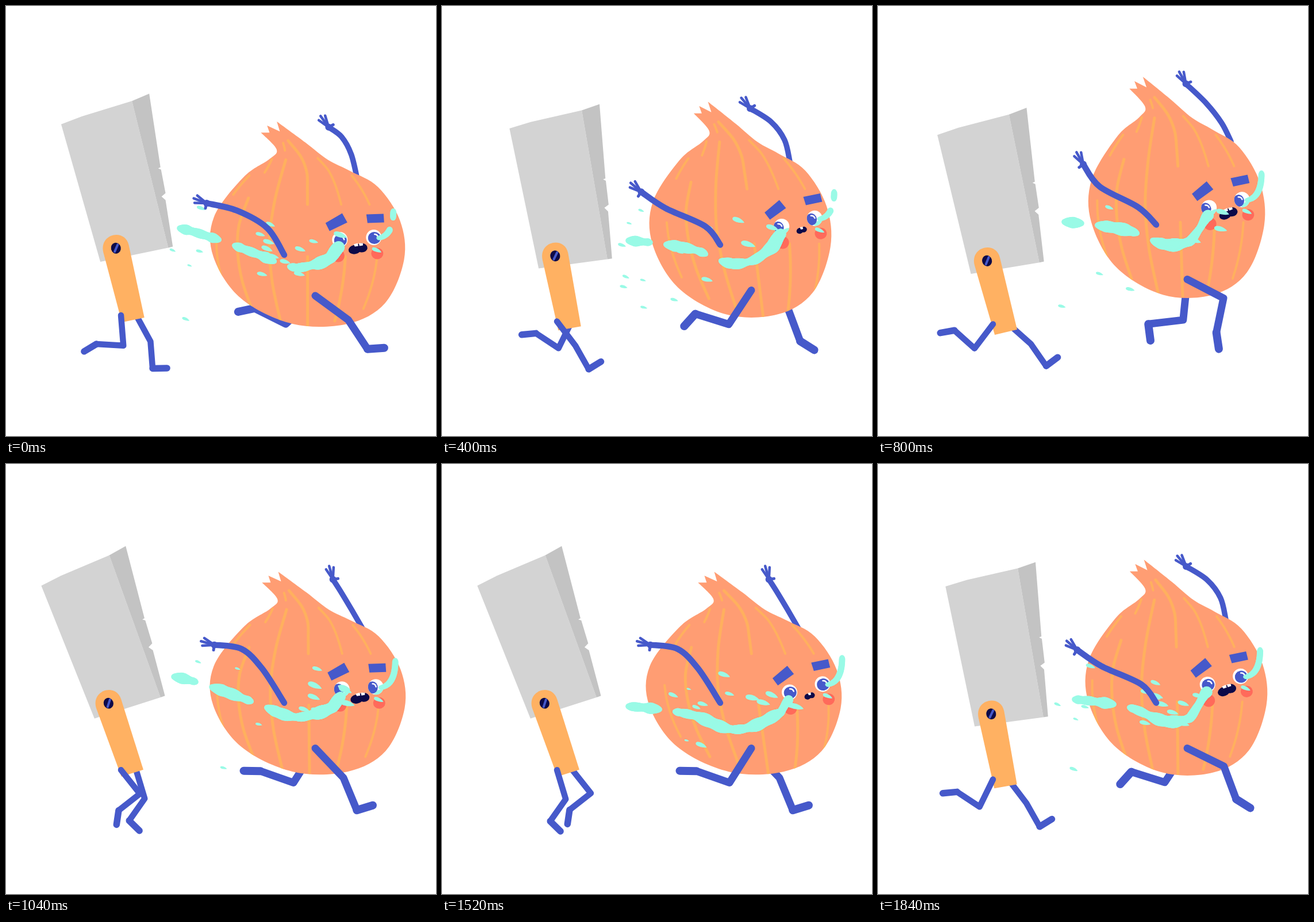
Write an HTML page with a canvas that moves like this. It is 748 by 748 pixels and loops after 1.92 s.

```html
<!DOCTYPE html>
<html lang="en">
<head>
<meta charset="utf-8">
<title>Onion on the run</title>
<style>
html, body { margin: 0; width: 100%; height: 100%; overflow: hidden; background: #fff; }
canvas { display: block; width: 100vw; height: 100vh; }
</style>
</head>
<body>
<canvas id="stage" width="748" height="748"></canvas>
<script>
const ctx = document.getElementById('stage').getContext('2d');
const STEP = 80, COUNT = 24, BOUNCE = 6, STRIDE = 12;
const C = {
  skin: '#ff9d73', stripe: '#ffb05e', wood: '#ffb162', steel: '#d3d3d3', edge: '#c3c3c3',
  blue: '#4659ca', navy: '#0d0a48', tear: '#99fae6', cheek: '#ff6a5b', white: '#fff'
};

const rad = d => d * Math.PI / 180;
const clamp = (v, a, b) => Math.max(a, Math.min(b, v));
const mix = (a, b, u) => a + (b - a) * u;
const rnd = (i, k) => { const v = Math.sin(i * 127.1 + k * 311.7) * 43758.5453; return v - Math.floor(v); };

// Periodic motion: mean plus two harmonics
function wave(n, period, mean, c1, s1, c2 = 0, s2 = 0) {
  const a = n / period * 2 * Math.PI;
  return mean + c1 * Math.cos(a) + s1 * Math.sin(a) + c2 * Math.cos(2 * a) + s2 * Math.sin(2 * a);
}

function spline(pts) {
  ctx.moveTo(...pts[0]);
  for (let i = 0; i < pts.length - 1; i++) {
    const a = pts[i - 1] || pts[i], b = pts[i], c = pts[i + 1], d = pts[i + 2] || c;
    ctx.bezierCurveTo(b[0] + (c[0] - a[0]) / 6, b[1] + (c[1] - a[1]) / 6,
      c[0] - (d[0] - b[0]) / 6, c[1] - (d[1] - b[1]) / 6, c[0], c[1]);
  }
}
function line(pts, width, color = C.blue) {
  ctx.beginPath();
  pts.forEach(p => ctx.lineTo(...p));
  ctx.lineWidth = width;
  ctx.strokeStyle = color;
  ctx.stroke();
}
function curve(pts, width, color = C.blue) {
  ctx.beginPath();
  spline(pts);
  ctx.lineWidth = width;
  ctx.strokeStyle = color;
  ctx.stroke();
}
function poly(pts, color) {
  ctx.beginPath();
  pts.forEach(p => ctx.lineTo(...p));
  ctx.closePath();
  ctx.fillStyle = color;
  ctx.fill();
}
function oval(x, y, rx, ry, color, turn = 0) {
  ctx.beginPath();
  ctx.ellipse(x, y, rx, ry, turn, 0, 7);
  ctx.fillStyle = color;
  ctx.fill();
}

// Bone angles are in degrees from straight down, forward is positive.
function leg(hip, bones, width) {
  const pts = [hip];
  for (const [len, deg] of bones) {
    const [x, y] = pts[pts.length - 1];
    pts.push([x + len * Math.sin(rad(deg)), y + len * Math.cos(rad(deg))]);
  }
  line(pts.slice(0, 3), width);
  line(pts.slice(2), width + 1);
}
function onionLeg(hip, p) {
  leg(hip, [
    [71, wave(p, STRIDE, 17, 50, -10.6, -13.2, -5.5)],
    [61, wave(p, STRIDE, -45.5, 75, 2, 4)],
    [29, wave(p, STRIDE, 8, 86, 49)]
  ], 13);
}
function knifeLeg(hip, p) {
  leg(hip, [
    [53, wave(p, STRIDE, 16.6, -12, 42.5, 0, 12.7)],
    [47, wave(p, STRIDE, -46, -49, 68, 1.5, 2)],
    [25, wave(p, STRIDE, 21, -75, 76, -5)]
  ], 10.5);
}

function arm(from, to, bowA, bowB, width, bias, side) {
  const at = (u, bow) => [mix(from[0], to[0], u) + bow[0], mix(from[1], to[1], u) + bow[1]];
  const wrist = at(0.67, bowB);
  curve([from, at(0.33, bowA), wrist, to], width);
  const a = Math.atan2(to[1] - wrist[1], to[0] - wrist[0]) + bias;
  const finger = (turn, len, w = 4.5) =>
    line([to, [to[0] + Math.cos(a + turn) * len, to[1] + Math.sin(a + turn) * len]], w);
  for (let i = -1; i < 2; i++) finger(i * 0.33, 24 - 3 * Math.abs(i));
  finger(side * 1.7, 9, 5);
  oval(...to, 6, 6, C.blue);
}
function nearArm(n) {
  const w = (...k) => wave(n, BOUNCE, ...k);
  const bend = w(-11, -6, -14);
  arm([484, w(398, 35, 0)], [w(359.7, -10.7, 9.2), w(295, 48, -5)],
    [w(6, 9, -10), bend], [w(-3, 10.7, 5.8), bend], 10.5, 0.12, -1);
}
function farArm(n) {
  const w = (...k) => wave(n, BOUNCE, ...k);
  const bow = [w(2, 4, -11), w(-5, -8, -2)];
  arm([w(620, -9, 12), w(266, 35, 14.7)], [w(555, 0.5, 18.8, 5.8), w(168, 42.8, 13)], bow, bow, 9.5, 0.3, 1);
}

const OUTLINE = [
  [474, 202], [523, 238], [562, 268], [600, 287], [649, 315], [687, 373], [694, 440], [661, 515],
  [595, 551], [500, 551], [410, 507], [362, 435], [363, 367], [415, 298], [460, 267], [473, 250], [446, 221]
];

function onion(n, sway) {
  const w = (...k) => wave(n, BOUNCE, ...k);
  const left = w(360, -5.3, -3.5), right = w(687.5, 4, 10.4, 4);
  const top = w(156, 43.5, 12, 1.5), bottom = w(524, 34, -1), lean = w(-5.5, 4, 5);
  const place = ([x, y]) => {
    const h = Math.max(0, (411 - y) / 209);
    return [left + (x - 356) / 341 * (right - left) + lean * h * h, top + (y - 202) / 354 * (bottom - top)];
  };
  ctx.beginPath();
  spline(OUTLINE.map(place));
  for (const p of [[461, 221], [457, 209], [479, 219]]) ctx.lineTo(...place(p));
  ctx.closePath();
  ctx.fillStyle = C.skin;
  ctx.fill();
  ctx.save();
  ctx.clip();
  // Stripes follow the meridians and slide as the onion turns.
  const stripe = (u, y0, y1) => {
    const pts = [];
    for (let i = 0; i <= 4; i++) {
      const y = mix(y0, y1, i / 4), up = Math.max(0, (300 - y) / 60);
      const half = y < 410 ? 170 * (1 - ((410 - y) / 190) ** 2) : 170 - 40 * ((y - 410) / 123) ** 2;
      pts.push(place([526 - 28 * up * up + u * half + 0.15 * sway * (y - 250), y]));
    }
    curve(pts, y1 - y0 > 90 ? 5 : 4, C.stripe);
  };
  for (let i = 0; i < 6; i++) {
    const u = Math.sin(rad(-69 + 23 * i));
    stripe(u, i < 3 ? 400 - 66 * i : 435, 553 - 7 * (i - 3) ** 2);
    if (i > 2) stripe(u, 205 + 30 * (i - 2), 345);
    else stripe(u, 295 - 28 * i, 328 - 38 * i);
  }
  ctx.restore();
}

function eye(x, y, gaze, shut) {
  ctx.save();
  ctx.translate(x, y);
  if (shut) ctx.scale(0.95, 0.4);
  oval(0, 0, 13.5, 13.5, C.white);
  ctx.clip();
  if (gaze || shut) oval(7, 11, 10, 6, C.tear, -0.3);
  const px = shut ? 0 : gaze ? -6 : 1;
  oval(px, shut ? 4 : 1, gaze ? 9.5 : 11, 10.5, C.blue);
  if (!shut) {
    ctx.beginPath();
    ctx.arc(px, 1, 6.5, -1.5, -0.2);
    ctx.lineWidth = 2.5;
    ctx.strokeStyle = C.white;
    ctx.stroke();
  }
  ctx.restore();
}

function face(x, y, turn, n) {
  const p = n % STRIDE, gaze = n >= 4 && n < 16, shut = n === 16, brow = shut ? 6 : 0;
  ctx.save();
  ctx.translate(x, y);
  ctx.rotate(turn);
  oval(-33, 30, 11, 11, C.cheek);
  oval(35, 26, 10.5, 10, C.cheek);
  poly([[-55, brow - 27], [-26, brow - 44], [-17, brow - 28], [-48, brow - 13]], C.blue);
  poly([[16, brow - 42], [46, brow - 43], [47, brow - 28], [18, brow - 27]], C.blue);
  eye(-30, 2, gaze, shut);
  eye(29, -2, gaze, shut);
  if (p < 3 || p > 9) {
    oval(-4, 19, 11, 8, C.navy, -0.2);
    oval(8, 16, 10, 8, C.navy, 0.1);
    poly([[-6, 10], [1, 8], [2, 13], [-4, 14]], C.white);
    poly([[3, 8], [10, 8], [10, 12], [4, 13]], C.white);
  } else {
    oval(0, 15, 6, 5, C.navy, -0.2);
    oval(7, 14, 5.5, 5, C.navy);
    poly([[1, 9], [6, 9], [6, 13], [2, 13]], C.white);
  }
  ctx.restore();
}

// The tear stream runs left from the eye; gaps open in it and travel along.
function stream(ex, ey, fy, k, n) {
  const pts = [[ex, ey + 10], [ex - 14, ey + 28 + 4 * k], [542, fy + 44 + 22 * k], [500, fy + 50 + 21 * k],
    [440, fy + 28 + 20 * k], [370, fy + 2 + 34 * k], [290, fy - 20 + 50 * k]];
  const gaps = [];
  for (let i = 0; i < 10; i++) {
    const at = 540 - 40 * ((n - 0.9 - 2.4 * i + 48) % COUNT);
    if (at < 480) gaps.push(at);
  }
  const end = 290 + 32 * k;
  for (let i = 0; i < pts.length - 1; i++) {
    const [x0, y0] = pts[i], [x1, y1] = pts[i + 1];
    const m0 = (y1 - (pts[i - 1] || pts[i])[1]) / 2, m1 = ((pts[i + 2] || pts[i + 1])[1] - y0) / 2;
    for (let u = 0; u < 1; u += 0.025) {
      const x = mix(x0, x1, u), v = u * u, w = v * u;
      const y = (2 * w - 3 * v + 1) * y0 + (w - 2 * v + u) * m0 + (3 * v - 2 * w) * y1 + (w - v) * m1;
      const edge = Math.min(x - end, ...gaps.map(g => Math.abs(x - g) - 12));
      if (edge <= 0) continue;
      const full = 9 + 1.8 * Math.sin(x * 0.07 + n) + Math.sin(x * 0.21);
      const r = Math.min(full, 2 + Math.sqrt(edge) * 2);
      oval(x, y, r, r, C.tear);
    }
  }
}

function sideStream(x, y, n) {
  const split = n % 11 === 0 || n % 11 === 5;
  for (let u = 0; u <= 1; u += 0.04) {
    if (split && u > 0.5 && u < 0.85) continue;
    const a = (1 - u) * (1 - u), b = 2 * u * (1 - u), c = u * u;
    oval(x + 10 * a + 34 * b + 34 * c, y + a - 5 * b - 46 * c, 5.5, 4 + 4 * u, C.tear);
  }
}

function drop(x, y, len, turn) {
  ctx.save();
  ctx.translate(x, y);
  ctx.rotate(turn);
  ctx.scale(len / 24, len / 24);
  ctx.beginPath();
  ctx.moveTo(13, 2);
  ctx.bezierCurveTo(4, 6, -13, 6, -12, -1);
  ctx.bezierCurveTo(-11, -7, 5, -6, 13, 2);
  ctx.fillStyle = C.tear;
  ctx.fill();
  ctx.restore();
}

function drops(n, lift) {
  for (let i = 0; i < 30; i++) {
    const life = 6 + rnd(i, 1) * 10, age = (n - rnd(i, 2) * COUNT + COUNT) % COUNT;
    if (age > life) continue;
    const x = 535 + rnd(i, 3) * 105 - age * (18 + rnd(i, 4) * 13);
    const y = 370 + rnd(i, 5) * 70 + lift / (1 + age) + age * (rnd(i, 6) * 20 - 7);
    drop(x, y, 25 * (1 - 0.7 * age / life), 0.1 + rnd(i, 7) * 0.2);
  }
}

function knife(n, hipY) {
  const w = (...k) => wave(n, BOUNCE, ...k);
  const x = w(184, 7.2, -10.7), y = w(429.7, -8.5, -10.7);
  ctx.save();
  ctx.translate(x, y);
  ctx.save();
  ctx.rotate(rad(w(-1.6, 1.8, -5.8)));
  poly([[-96, -215], [-60, -229], [27, -256], [91, -1], [-27, 24]], C.steel);
  poly([[27, -256], [57, -269], [77, -141], [73, -139], [78, -137], [86, -96], [79, -90], [86, -84], [99, -3], [91, -1]], C.edge);
  ctx.restore();
  // The handle always points at the hips.
  ctx.rotate(Math.atan2(hipY + 12 - y, 222 - x) - Math.PI / 2);
  ctx.beginPath();
  ctx.moveTo(-20, 128);
  ctx.lineTo(-23, 2);
  ctx.bezierCurveTo(-23, -31, 23, -31, 23, 0);
  ctx.lineTo(20, 129);
  ctx.closePath();
  ctx.fillStyle = C.wood;
  ctx.fill();
  oval(0, 0, 8.5, 9.5, C.navy);
  ctx.rotate(0.25);
  line([[-2, 6], [3, -6]], 4);
  ctx.restore();
}

function draw(n) {
  const p = n % STRIDE;
  const left = wave(n, BOUNCE, 523.7, -0.6, 3.4, 2);
  const fx = left + wave(p, STRIDE, 94, -10.7, -1, 2.4, 4);
  const fy = wave(n, BOUNCE, 368.5, 32.5, 7.8, 3.5);
  const turn = rad(-10 * clamp((p - 3) / 2, 0, 1));
  const spot = (x, y) => [fx + x * Math.cos(turn) - y * Math.sin(turn), fy + x * Math.sin(turn) + y * Math.cos(turn)];
  const hip = [538, wave(n, BOUNCE, 485, 19, 0)];
  const hipY = wave(n, BOUNCE, 542.8, -4.8, -9.5);

  ctx.fillStyle = C.white;
  ctx.fillRect(0, 0, 748, 748);
  ctx.lineCap = ctx.lineJoin = 'round';

  farArm(n);
  onionLeg(hip, p + 6);
  onion(n, (1 - Math.cos(p * Math.PI / 6)) / 2);
  face(fx, fy, turn, n);

  stream(...spot(-32, 5), fy, clamp((p - 1) / 3, 0, 1), n);
  sideStream(...spot(29, -2), n);
  drop(...spot(34, 20), 17, 0.3);
  drops(n, fy - 375);

  nearArm(n);
  onionLeg(hip, p);

  knifeLeg([226, hipY - 1], p + 6);
  knife(n, hipY);
  knifeLeg([200, hipY], p);
}

let last = -1;
function tick() {
  const n = Math.floor(performance.now() / STEP) % COUNT;
  if (n !== last) draw(last = n);
  requestAnimationFrame(tick);
}
tick();
</script>
</body>
</html>
```
